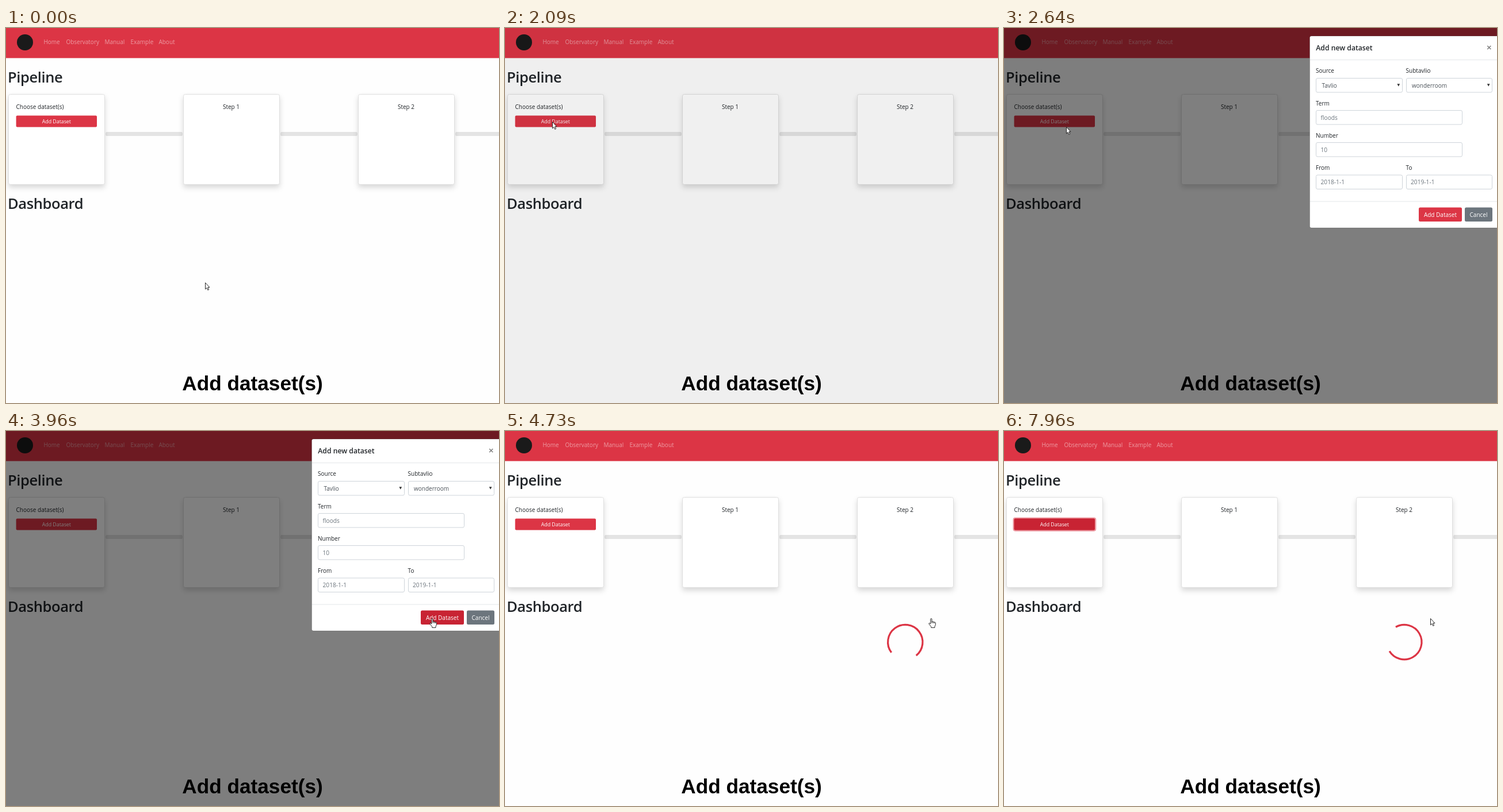
Animation, 857 px wide and 653 px high, one loop 8000 ms. Source, as an HTML page:

```html
<!DOCTYPE html>
<html lang="en">
<head>
<meta charset="utf-8">
<title>Add dataset(s)</title>
<style>
html, body { margin: 0; width: 100%; height: 100%; overflow: hidden; background: #fefefe; }
svg { display: block; width: 857px; height: 653px; }
text { font: 10px "Open Sans", "Noto Sans", sans-serif; fill: #212529; white-space: pre; }
.mid { text-anchor: middle; }
.head { font-size: 25.5px; font-weight: 600; letter-spacing: -.4px; }
.title { font-size: 12.2px; font-weight: 600; }
.nav { fill: rgba(255, 255, 255, .5); }
.light { fill: #fff; }
.small { font-size: 8.8px; }
.value { fill: #495057; }
.hint { fill: #6c757d; font-size: 10.2px; }
.caption { font: bold 35.2px "Liberation Sans", Arial, sans-serif; fill: #000; }
.card { fill: #fff; stroke: #dfdfdf; filter: drop-shadow(0 5px 5px rgba(0, 0, 0, .15)); }
.field { fill: #fff; stroke: #ced4da; }
</style>
</head>
<body>
<svg id="stage" viewBox="0 0 857 653"></svg>
<script>
const LOOP = 8000;
const RED = '#dc3545', DARK_RED = '#c82333';

const text = (x, y, s, cls = '') => `<text x="${x}" y="${y}" class="${cls}">${s}</text>`;
const rect = (x, y, w, h, r, attrs) =>
  `<rect x="${x}" y="${y}" width="${w}" height="${h}" rx="${r}" ${attrs}/>`;
const field = (x, y, w) => rect(x + .5, y + .5, w - 1, 24.5, 2.5, 'class="field"');
const caret = x => `<path d="M${x} 97.3h4.8l-2.4 4.4z" fill="#333"/>`;

const nav = [[66, 'Home'], [105, 'Observatory'], [172, 'Manual'], [217, 'Example'], [266, 'About']]
  .map(([x, s]) => text(x - .6, 28, s, 'nav')).join('');

const links = [173, 477, 781].map(x => rect(x, 181, 134, 7, 2.5, 'fill="#e4e4e4"')).join('');
const cards = [4, 308, 612].map(x => rect(x + .5, 115.5, 167, 157, 3, 'class="card"')).join('');

const page = `
  <rect width="857" height="653" fill="#fefefe"/>
  <rect width="857" height="52.4" fill="${RED}"/>
  <circle cx="33" cy="25" r="14" fill="#1a1a1a"/>
  ${nav}
  ${text(3, 95, 'Pipeline', 'head')}
  ${text(3, 315, 'Dashboard', 'head')}
  ${links}${cards}
  ${text(17.5, 141, 'Choose dataset(s)')}
  ${text(391.5, 141, 'Step 1', 'mid')}
  ${text(695.5, 141, 'Step 2', 'mid')}
  ${rect(16.6, 151.6, 142.6, 22, 3, `id="ring" fill="none" stroke="${RED}" stroke-opacity=".5" stroke-width="2.2"`)}
  ${rect(17.6, 152.6, 140.4, 19.8, 2, `fill="${RED}"`)}
  ${rect(17.6, 152.6, 140.4, 19.8, 2, `id="focus" fill="${DARK_RED}"`)}
  ${text(87.8, 166, 'Add Dataset', 'mid small light')}
  <circle id="spinner" cx="695.8" cy="367.6" r="30.2" fill="none" stroke="${RED}"
    stroke-width="3.2" pathLength="360" stroke-dasharray="268 92"/>`;

const modal = `
  ${rect(531.5, 14, 330, 334, 3, 'fill="#fff" stroke="#000" stroke-opacity=".2"')}
  <path d="M532 55.5H857M532 302H857" stroke="#e3e6e9"/>
  ${text(542.3, 39.3, 'Add new dataset', 'title')}
  <path d="M840.3 31l6 6m0-6l-6 6" stroke="#7f7f7f" stroke-width="1.6"/>
  ${text(542, 78.3, 'Source')}${text(698.6, 78.3, 'Subtavlio')}
  ${field(542, 87, 151)}${field(699, 87, 150)}
  ${text(552.5, 103.7, 'Tavlio', 'value')}${text(709, 103.7, 'wonderroom', 'value')}
  ${caret(683.4)}${caret(839.8)}
  ${text(542, 134.5, 'Term')}${field(542, 143, 255)}${text(550.5, 160, 'floods', 'hint')}
  ${text(542, 190.7, 'Number')}${field(542, 199, 255)}${text(550.5, 216, '10', 'hint')}
  ${text(542, 246.7, 'From')}${text(698.6, 246.7, 'To')}
  ${field(542, 255.5, 151)}${field(699, 255.5, 150)}
  ${text(550.5, 272.3, '2018-1-1', 'hint')}${text(707, 272.3, '2019-1-1', 'hint')}
  ${rect(721, 312.6, 75, 24.4, 2.5, `id="submit" fill="${RED}"`)}
  ${rect(801, 312.6, 48, 24.4, 2.5, 'fill="#6c757d"')}
  ${text(758.4, 328.8, 'Add Dataset', 'mid light')}${text(825, 328.8, 'Cancel', 'mid light')}`;

const pointer = `
  <path id="arrow" d="M.5 .6V11.8L3 9.5 4.8 13.4 6.6 12.6 4.9 8.7H8Z"
    fill="#fff" stroke="#111" stroke-width=".9"/>
  <path id="hand" transform="translate(-5 0)" fill="#fff" stroke="#111" stroke-width=".9"
    d="M3.8 1.6C3.8 .2 6 .2 6 1.6V6.2C6.4 5.2 8 5.4 8.2 6.6C8.8 5.8 10.2 6.1 10.3 7.2C11 6.6 12.4 7 12.4 8.2V11.5L11 14.5V16.4H4.8V14.8L1 10C.2 8.8 1.7 7.9 2.6 8.8L3.8 10ZM6 6V8.5M8.2 6.6V8.7M10.3 7.2V9"/>`;

document.getElementById('stage').innerHTML = `${page}
  <rect id="shade" width="857" height="653"/>
  <g id="modal">${modal}</g>
  <g id="cursor">${pointer}</g>
  ${text(428.5, 631, 'Add dataset(s)', 'caption mid')}`;

const el = {};
for (const id of ['ring', 'focus', 'spinner', 'shade', 'modal', 'submit', 'cursor', 'arrow', 'hand'])
  el[id] = document.getElementById(id);

const ticks = [0];
for (const [from, to, n] of [
  [540, 1310, 11], [1390, 2090, 10], [2180, 2260, 2], [2330, 3020, 10], [3100, 3880, 11],
  [3960, 4430, 2], [4505, 4730, 4], [4820, 5220, 6], [5280, 6070, 11], [6150, 6940, 11],
  [7010, 7800, 11], [7880, 7960, 2]
]) for (let i = 0; i < n; i++) ticks.push(Math.round(from + (to - from) * i / (n - 1)));

// Pointer path: time, x, y.
const path = [
  [0, 346, 443], [463, 346, 443], [620, 325, 424], [1000, 180, 282], [1310, 98, 205],
  [1600, 84, 170], [2000, 82, 163], [2520, 82, 163], [2600, 84, 164], [2800, 215, 205],
  [3020, 398, 258], [3300, 580, 290], [3600, 700, 316], [3880, 736, 322], [3960, 741, 326],
  [LOOP, 741, 326]
];

const ramp = (t, start, length) => Math.min(1, Math.max(0, (t - start) / length));
const easeOut = x => 1 - (1 - x) ** 1.7;

function pointerAt(t) {
  const i = path.findIndex(p => p[0] > t);
  const [t0, x0, y0] = path[i - 1], [t1, x1, y1] = path[i];
  const k = (t - t0) / (t1 - t0);
  return [x0 + (x1 - x0) * k, y0 + (y1 - y0) * k];
}

function draw(time) {
  const t = ticks.filter(s => s <= time + .5).pop();
  const overButton = t >= 3700 && t < 4820;

  el.shade.setAttribute('opacity', .5 * (ramp(t, 2072, 150) - ramp(t, 4560, 150)));

  const lift = 33 * (1 - easeOut(ramp(t, 2237, 300)) + easeOut(ramp(t, 4400, 300)));
  el.modal.setAttribute('transform', `translate(0 ${-lift})`);
  el.modal.setAttribute('opacity', ramp(t, 2237, 150) - ramp(t, 4400, 150));
  el.submit.setAttribute('fill', overButton ? DARK_RED : RED);

  const focus = ramp(t, 4740, 150);
  el.ring.setAttribute('opacity', focus);
  el.focus.setAttribute('opacity', focus);

  el.spinner.setAttribute('visibility', t >= 4430 ? 'visible' : 'hidden');
  el.spinner.setAttribute('transform', `rotate(${143 + .476 * (t - 4730)} 695.8 367.6)`);

  const [x, y] = pointerAt(t);
  el.cursor.setAttribute('transform', `translate(${Math.round(x)} ${Math.round(y)})`);
  el.hand.setAttribute('visibility', overButton ? 'visible' : 'hidden');
  el.arrow.setAttribute('visibility', overButton ? 'hidden' : 'visible');
}

const start = performance.now();
function loop() {
  draw((performance.now() - start) % LOOP);
  requestAnimationFrame(loop);
}
loop();
</script>
</body>
</html>
```
